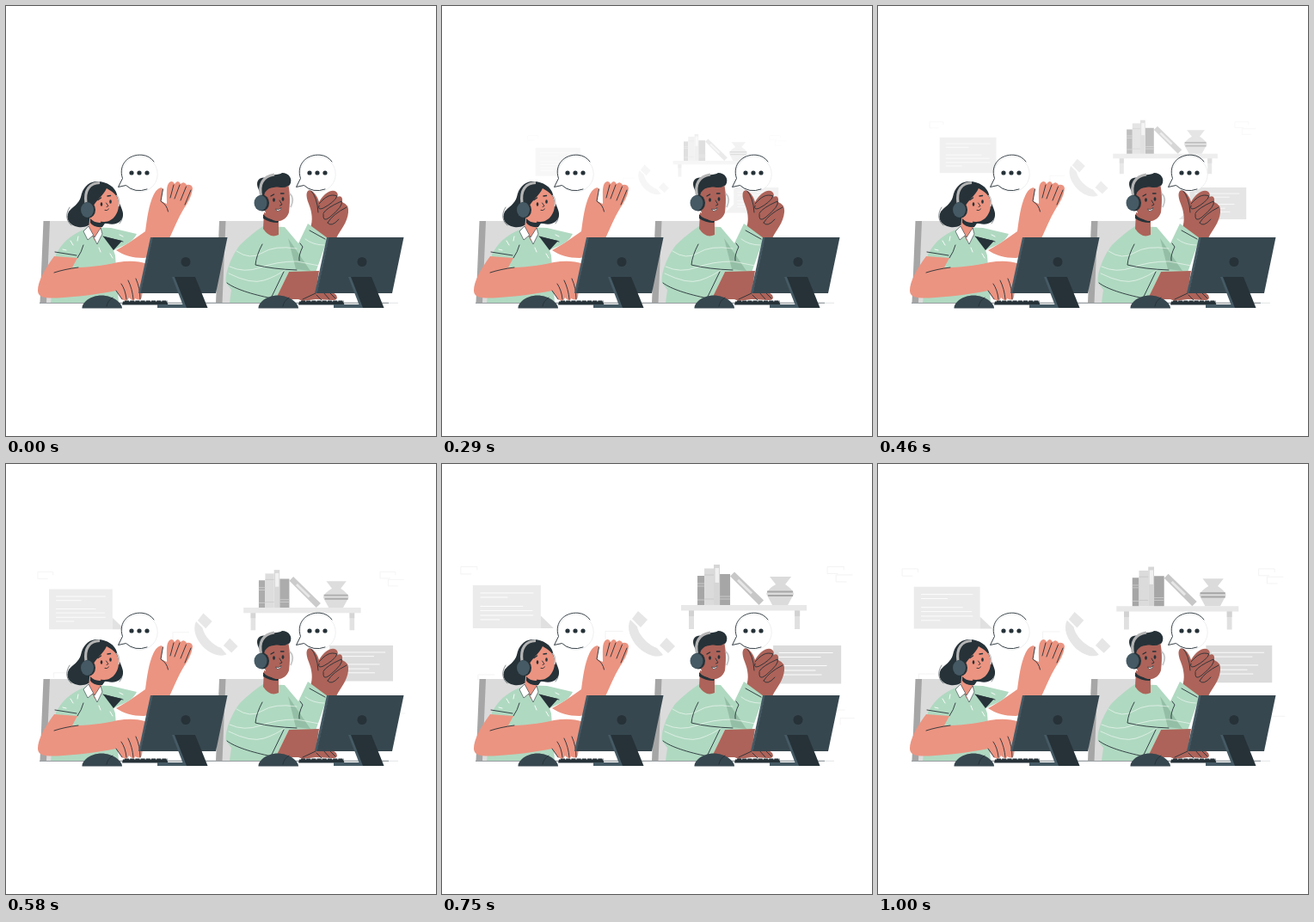
Write an HTML page that moves like this. It is 500x500 px and loops after 1.04 s.

```html
<!DOCTYPE html>
<html>
<head>
<meta charset="utf-8">
<style>
html, body { margin: 0; width: 100%; height: 100%; overflow: hidden; background: #fff }
svg { display: block; width: 100%; height: 100% }
.dark { fill: #263238 }
.slate { fill: #37474f }
.steel { fill: #455a64 }
.green { fill: #b0d9c1 }
.peach { fill: #eb9481 }
.brown { fill: #ad6359 }
.ink, .white, .faint { fill: none; stroke: #263238; stroke-width: .9; stroke-linecap: round; stroke-linejoin: round }
.white { stroke: #fff }
.faint { stroke: #ebebeb; stroke-width: .6 }
.thin { stroke-width: .55 }
.bold { stroke-width: 1.4 }
</style>
</head>
<body>
<svg viewBox="0 0 500 500">
<defs>
  <g id="chair">
    <path d="M50 250H110V345H46Z" fill="#dbdbdb"/>
    <path d="M43.500 250H51L47 345H39.500Z" fill="#a6a6a6"/>
  </g>
  <g id="bubble">
    <path d="M139.500 208.500L130.500 210.500L135.500 200.500A20.700 20.700 0 1 1 139.500 208.500Z" fill="#fff" stroke="#dcdfe0" stroke-width=".5"/>
    <path class="ink" d="M164 213Q150 218 139.500 208.500L130.500 210.500L135.500 200.500C130 184 143 172 158 173.200Q167 174 172 181"/>
    <g class="dark"><circle cx="146" cy="194" r="2.600"/><circle cx="155" cy="194" r="2.600"/><circle cx="164" cy="194" r="2.600"/></g>
  </g>
  <g id="desk">
    <path class="dark" d="M136 343.500H187L188.500 347.500H135Z"/>
    <path d="M138 343.500H188" stroke="#263238" stroke-width="2" stroke-dasharray="5 1.200"/>
    <path class="steel" d="M176 347H214V351H176Z"/>
    <path class="steel" d="M168 269H171L157 334H154Z"/>
    <path class="slate" d="M170.500 269H257.500L244 334H156.500Z"/>
    <circle class="dark" cx="209" cy="297.500" r="5.500"/>
    <path class="steel" d="M193 315H199L213 351H207Z"/>
    <path class="dark" d="M196 315H220L234.500 351H210Z"/>
    <path class="slate" d="M88.500 351.500C88 345 98 336.500 111 336.500S135 345 135 351.500Z"/>
    <path class="ink" d="M117 349Q118 343 124 339"/>
  </g>
</defs>

<g id="back">
  <path d="M36 141H115V191H36Z" fill="#ebebeb"/>
  <path d="M115 176.500L130 191H115Z" fill="#e0e0e0"/>
  <path class="white" d="M45 150H106M45 155H76M45 165.500H94M45 170.500H105M45 176H106M45 181H67"/>

  <g fill="#e6e6e6">
    <path d="M219 181C214 191 219 204 229 214C238 222 249 226 257 222L250 214C241 211 229 200 227 189Z"/>
    <path d="M228 171L239 181L231 190L221 180ZM261 202L271 212L263 220L253 211Z"/>
  </g>

  <path d="M287 170H293V192H287ZM410 170H416V192H410Z" fill="#e0e0e0"/>
  <path d="M287 170H293V177H287ZM410 170H416V177H410Z" fill="#d2d2d2"/>
  <path d="M278 164H424V170.500H278Z" fill="#e8e8e8"/>
  <path d="M297 130H305V164H297ZM323 128H335V164H323Z" fill="#a6a6a6"/>
  <path d="M305 121.500H316V164H305Z" fill="#dbdbdb"/>
  <path d="M316 117H323V164H316Z" fill="#d6d6d6"/>
  <path d="M317.500 121H322V138H317.500Z" fill="#f0f0f0"/>
  <path d="M297 139H305M297 142H305M297 158H305M305 129H316M305 157H316M323 154H335M323 157H335" stroke="#c9c9c9"/>
  <path d="M335 130.500L340 125.500L374 158.500L368.500 164Z" fill="#c7c7c7"/>
  <path d="M344 135L360 150.500" stroke="#e6e6e6" stroke-width="3"/>
  <path d="M381 131H406L399 140Q408 146 409 151L402 164H384L377 151Q379 145 388 140Z" fill="#dbdbdb"/>
  <path d="M378 148.500H408M379 153H408" stroke="#a6a6a6" stroke-width="2"/>

  <path d="M385 211H464V255.500H370L385 241Z" fill="#dbdbdb"/>
  <path class="white" d="M392 219.500H454M392 224.500H440M392 234.500H447M392 240H434M392 245H441"/>

  <path class="faint" d="M34 128H22V119.500H41V123M460 127.500H448V119.500H467V123M470 137H458V129H477M190 203V194.500H210M42 251V245H61M460 286H468M463 303V295.500H479"/>
</g>

<path d="M39 345.300H445" stroke="#263238" stroke-width=".6"/>
<path d="M445 345.300H456" stroke="#cfd3d5" stroke-width=".6"/>
<use href="#chair"/>
<use href="#chair" x="204.500"/>

<!-- woman -->
<path class="peach" d="M128 284C144 275 155 267 162 262C164 247 166 232 171 221C175 212 181 209 182.500 213L180 227L187 230C187 217 186 209 190 205Q194 202 196 207Q200 201 203 207Q207 203 210 208Q216 207 217 212C216 222 211 229 206 237C200 247 196 257 191 268C185 283 173 292 160 293C147 293 137 290 128 284Z"/>
<path class="ink" d="M182.500 213L180 227Q187 231 188.500 239M195 208L191 223M202 208L196 224M209.500 210L203 226M215 214L208 231"/>
<path class="green" d="M97 257C80 264 67 271 58 289L52 345H131L127 290L125 284L140 277Q149 272 152 265L122 258Z"/>
<path class="dark" d="M113 268L135 273L125 284Z"/>
<path class="ink" d="M113 268L136 274M83 293Q88 286 90 278"/>
<path class="white" d="M75 273L78 278M84 268L83 273M108 281L110 286M121 288L124 293M132 266L136 268M80 319L82 325M66 283L70 284"/>
<path class="dark" d="M104 204C95 205 89 212 87 222C85 230 77 234 73 239C69 247 73 255 84 257C92 258 97 255 100 252L118 253C128 256 137 250 136 241C135 234 130 228 129 219C127 210 116 203 104 204Z"/>
<path class="ink thin" d="M74 234C68 243 71 251 76 255M132 232Q139 246 132 253"/>
<path class="peach" d="M98 238L96 259L103 273L111 260L110 249Z"/>
<path class="dark" d="M98 247Q105 255 117 250L112 257Q102 258 98 252Z"/>
<path class="peach" d="M100 236C103 227 113 221 117 212C122 215 130 219 131 228C132 240 125 251 114 251C106 251 99 245 98 238Z"/>
<path d="M128.500 220Q133 224 131 233" fill="none" stroke="#c7c7c7" stroke-width="1.500"/>
<g class="dark"><ellipse cx="111" cy="230.500" rx="1.300" ry="2.200"/><ellipse cx="121.500" cy="227.500" rx="1.300" ry="2.200"/></g>
<path class="ink bold" d="M107 225.500L110.500 223M118 221L121.500 220.500"/>
<path class="ink" d="M116.500 229L119 232.500L117 233.500M115 237.500Q118 238.500 119.500 236"/>
<path d="M93 229C91 214 97 206 109 205.500" fill="none" stroke="#b5b5b5" stroke-width="3.200"/>
<ellipse class="dark" cx="96" cy="237" rx="8" ry="9.500"/>
<ellipse class="steel" cx="94.500" cy="237" rx="7.500" ry="9"/>
<path d="M96 256L90 262L95 272L101 267L106 277L112 265L110 258L103 269Z" fill="#fff" stroke="#263238" stroke-width=".6"/>
<path class="peach" d="M56 291C45 306 37 320 37 331C37 339 46 340 60 339.500C86 338 108 335 128 331L135 341Q141 345 143 339Q149 345 150 340Q157 344 158 338L164 300C154 296 142 296 130 298C112 302 96 304 77 304L83 293Z"/>
<path class="ink" d="M56 310Q68 306 84 304M57 286L82 290M134 323Q139 330 140 341M142 319Q147 329 148 341M151 317Q156 328 156 341M128 331L135 341"/>

<!-- man -->
<path class="brown" d="M354 258C357 249 356 240 352 230C348 220 349 214 354 214C360 217 363 224 364 228C369 219 378 212 384 216Q387 219 385 222Q392 219 391 228Q399 231 398 240C397 252 389 260 384 270L372 277Z"/>
<path class="ink" d="M354 214Q362 222 363 240M364 230C371 222 377 218 385 221Q382 228 369 235Q362 238 364 232M369 241Q372 235 390 227Q393 232 376 246Q368 252 369 242M374 252Q380 242 396 234M374 252Q378 258 387 248"/>
<path class="green" d="M299 256C290 262 280 270 272 278C264 288 254 309 256 322L262 330L260 345H312L329 309L360 310L374 270L351 253L340 276L324 257Z"/>
<path d="M328 270L354 308L337 306Z" fill="#94bfa6"/>
<path class="white thin" d="M260 303Q277 311 296 304T338 297L364 302M259 311Q285 324 300 319T324 307M268 285Q284 296 298 287T338 282M348 271Q357 278 370 278"/>
<path class="ink" d="M298 277Q291 290 290 301Q310 306 338 307M257 322C266 329 285 335 309 340M342 276L345 280Q340 290 341 296M353 261L371 271M323 309L307 342"/>
<path class="brown" d="M329 309L364 308L360 334Q377 329 384 336Q387 342 380 342L360 341L345 343L340 341L316 341L314 340Z"/>
<path class="ink" d="M361 336L367 342M369 333L376 341M376 333L383 340M345 341L360 334"/>
<path class="brown" d="M300 240L299 259Q307 271 317 266L317 247Z"/>
<path class="dark" d="M299 242Q305 250 318 248L316 252Q306 252 299 247Z"/>
<path class="dark" d="M294 214C289 204 294 198 304 200C308 195 317 197 321 194C329 194 334 201 330 208C326 213 315 211 308 213L302 224L298 222Z"/>
<path class="brown" d="M301 217Q305 211 311 211L328 207C331 219 330 232 329 240C326 250 315 253 307 247C299 241 298 227 301 217Z"/>
<path class="dark" d="M303 204H331Q329 212 319 211Q310 209 303 213Z"/>
<path d="M330 218Q336 224 331 234" fill="none" stroke="#c7c7c7" stroke-width="1.800"/>
<g class="dark"><ellipse cx="311.500" cy="225.500" rx="1.400" ry="2.300"/><ellipse cx="322" cy="224.500" rx="1.400" ry="2.300"/></g>
<path class="ink bold" d="M308 221L311.500 219M319.500 218L323 218"/>
<path class="ink" d="M318 226L321 231L318.500 232"/>
<path d="M313.500 236Q317 238 320 234.500Q319.500 238.500 315.500 238.500Z" fill="#fff" stroke="#263238" stroke-width=".6"/>
<path d="M297 222C293 207 299 198 312 196" fill="none" stroke="#b5b5b5" stroke-width="3.200"/>
<ellipse class="dark" cx="298" cy="229" rx="8" ry="9.500"/>
<ellipse class="steel" cx="296" cy="229" rx="7.500" ry="9"/>

<use href="#bubble"/>
<use href="#bubble" x="207"/>
<use href="#desk"/>
<use href="#desk" x="205"/>
</svg>
<script>
const back = document.getElementById('back');
const LOOP = 1040, STEP = 1000 / 24, PEAK = 1.0275;
const bezier = (a, b, u) => 3 * (1 - u) * (1 - u) * u * a + 3 * (1 - u) * u * u * b + u * u * u;

// cubic-bezier(.36, -.01, .5, 1.38): eases in and overshoots
function ease(x) {
  let lo = 0, hi = 1;
  for (let i = 0; i < 30; i++) {
    const mid = (lo + hi) / 2;
    if (bezier(.36, .5, mid) < x) lo = mid; else hi = mid;
  }
  return bezier(-.01, 1.38, hi);
}

function draw() {
  const step = Math.floor((performance.now() % LOOP + 4) / STEP);
  const y = ease(Math.min(1, step / 24 + .025));
  const scale = (.5 + y / 2) / PEAK;
  back.setAttribute('transform', `translate(250 211) scale(${scale}) translate(-250 -211)`);
  back.setAttribute('opacity', Math.max(0, Math.min(1, y)));
  requestAnimationFrame(draw);
}
draw();
</script>
</body>
</html>
```
